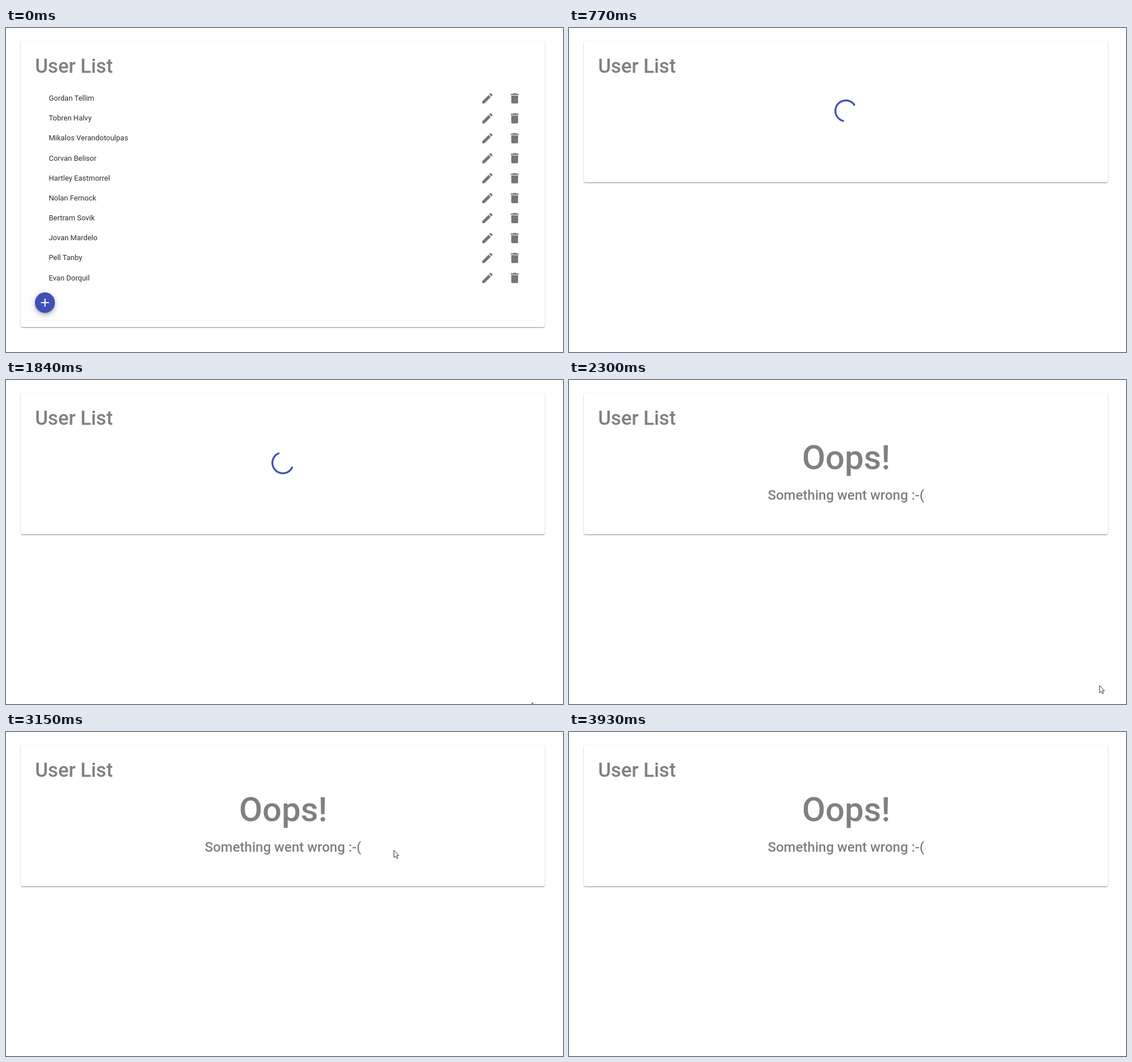
An HTML page for the animation above (4.86 s loop, 980 by 571 pixels).

```html
<!DOCTYPE html>
<html lang="en">
<head>
<meta charset="utf-8">
<title>User List</title>
<style>
  html, body { margin: 0; width: 100%; height: 100%; overflow: hidden; background: #fff; }
  #stage { position: relative; width: 980px; height: 571px; overflow: hidden; font-family: Roboto, sans-serif; }
  #card {
    position: absolute; left: 26px; top: 22px; width: 922px; border-radius: 3.5px; background: #fff;
    box-shadow: 0 .9px 2.8px rgba(0,0,0,.26), 0 .9px .9px rgba(0,0,0,.14), 0 1.8px .9px -.9px rgba(0,0,0,.12);
  }
  #add {
    position: absolute; left: 51px; top: 466.4px; width: 35.2px; height: 35.2px; border-radius: 50%; background: #3f51b5;
    box-shadow: 0 2.6px 4.4px -.9px rgba(0,0,0,.2), 0 5.3px 8.8px rgba(0,0,0,.14), 0 .9px 15.8px rgba(0,0,0,.12);
  }
  svg { position: absolute; left: 0; top: 0; }
  .head { font-weight: 500; fill: #808080; }
  .mid { text-anchor: middle; }
  .name { font-size: 13px; fill: rgba(0,0,0,.82); }
  .icon { fill: #757575; }
</style>
</head>
<body>
<div id="stage">
  <div id="card"></div>
  <div id="add"></div>
  <svg width="980" height="571" viewBox="0 0 980 571">
    <defs>
      <path id="edit" d="M3 17.25V21h3.75L17.81 9.94l-3.75-3.75L3 17.25zM20.71 7.04a1 1 0 0 0 0-1.41l-2.34-2.34a1 1 0 0 0-1.41 0l-1.83 1.83 3.75 3.75 1.83-1.83z"/>
      <path id="bin" d="M6 19c0 1.1.9 2 2 2h8c1.1 0 2-.9 2-2V7H6v12zM19 4h-3.5l-1-1h-5l-1 1H5v2h14V4z"/>
    </defs>
    <text class="head" x="51.3" y="79" font-size="34.6">User List</text>
    <g id="list">
      <path d="M61.6 484h14M68.6 477v14" stroke="#fff" stroke-width="2"/>
    </g>
    <circle id="spinner" cx="487" cy="146" r="18.36" fill="none" stroke="#3f51b5" stroke-width="3.27" stroke-dasharray="72.7 200"/>
    <g id="error" class="head mid">
      <text x="487.6" y="157" font-size="59.6">Oops!</text>
      <text x="487.4" y="211" font-size="24">Something went wrong :-(</text>
    </g>
    <path id="cursor" d="M.5.5v12.7l2.9-2.7 2 4.5 2-.9-2-4.3h3.8z" fill="#fff" stroke="#222" stroke-width=".9"/>
  </svg>
</div>
<script>
const LOOP = 4860, LOAD = 380, FAIL = 2300, STEP = 77.1, ROW = 35.17;
const names = ['Gordan Tellim', 'Tobren Halvy', 'Mikalos Verandotoulpas', 'Corvan Belisor', 'Hartley Eastmorrel',
  'Nolan Fernock', 'Bertram Sovik', 'Jovan Mardelo', 'Pell Tanby', 'Evan Dorquil'];

// Eased pointer strokes, each starting where the one before ended
const home = [925, 573];
const strokes = [
  { from: 1760, to: 2070, via: [922, 556], end: [940, 548] },
  { from: 2236, to: 2850, via: [818, 362], end: [692, 205] },
  { from: 3085, to: 3620, via: [535, 250], end: [937, 509] },
  { from: 3620, to: 3900, via: [940, 545], end: [921, 573] },
];

const $ = id => document.getElementById(id);
const show = (el, on) => { el.style.display = on ? '' : 'none'; };
const clamp = u => Math.min(1, Math.max(0, u));
const ease = u => u < 0.5 ? 2 * u * u : 1 - 2 * (1 - u) ** 2;
const bezier = (a, b, c, u) => a.map((p, i) => (1 - u) ** 2 * p + 2 * u * (1 - u) * b[i] + u * u * c[i]);

$('list').innerHTML += names.map((name, i) => `<g transform="translate(0 ${ROW * i})">
    <text class="name" x="75.2" y="128">${name}</text>
    <use class="icon" href="#edit" x="835" y="112"/>
    <use class="icon" href="#bin" x="883" y="112"/>
  </g>`).join('');

const pointerAt = t => strokes.reduce(
  (pos, s) => bezier(pos, s.via, s.end, ease(clamp((t - s.from) / (s.to - s.from)))), home);

function draw(time) {
  // The screen refreshes in fixed steps
  const step = Math.floor((time - LOAD + 15) / STEP);
  const t = LOAD + step * STEP;
  const listed = time < LOAD, failed = t >= FAIL;

  $('card').style.height = (listed ? 505 : 250) + 'px';
  show($('list'), listed);
  show($('add'), listed);
  show($('spinner'), !listed && !failed);
  show($('error'), failed);
  $('spinner').setAttribute('transform', `rotate(${step * 20.1} 487 146)`);
  $('cursor').setAttribute('transform', `translate(${pointerAt(t).map(Math.round)})`);
}

const start = performance.now();
function tick() {
  draw((performance.now() - start) % LOOP);
  requestAnimationFrame(tick);
}
tick();
</script>
</body>
</html>
```
